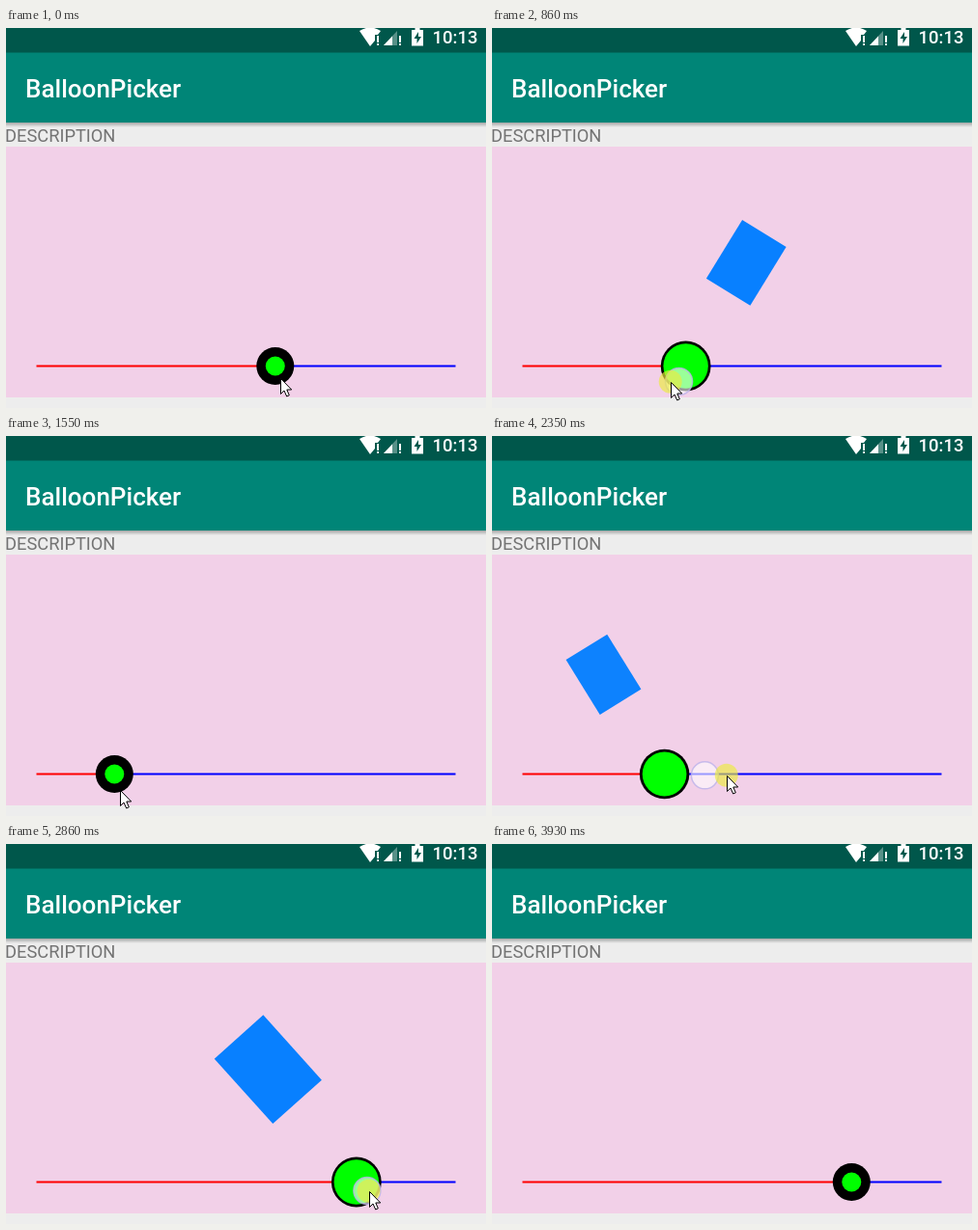
An HTML page that plays this animation: 497 by 394 pixels, repeating every 4.16 s.

```html
<!DOCTYPE html>
<html lang="en">
<head>
<meta charset="utf-8">
<title>BalloonPicker</title>
<style>
  html, body { margin: 0; width: 100%; height: 100%; overflow: hidden; background: #ededed; }
  svg { display: block; width: 497px; height: 394px; }
  text { font-family: Roboto, sans-serif; }
  .bar { fill: #fff; font-weight: 500; }
</style>
</head>
<body>
<svg viewBox="0 0 497 394">
  <defs>
    <linearGradient id="shade" x2="0" y2="1">
      <stop stop-color="#000" stop-opacity=".3"/>
      <stop offset="1" stop-color="#000" stop-opacity="0"/>
    </linearGradient>
  </defs>

  <rect width="497" height="394" fill="#ededed"/>
  <rect y="123" width="497" height="260" fill="#f2d0e8"/>
  <rect y="98" width="497" height="5" fill="url(#shade)"/>
  <rect width="497" height="98" fill="#008577"/>
  <rect width="497" height="25.500" fill="#00574b"/>

  <g fill="#fff">
    <path d="M366 3Q377-4 388 3L385 7H382V13L377 19Z"/>
    <path d="M384 8h2v7h-2zM384 16h2v2h-2zM407 8h2v7h-2zM407 16h2v2h-2z"/>
    <path d="M391 18L405 3V18Z" opacity=".35"/>
    <path d="M391 18L400 8.500V18Z"/>
    <path d="M420 2h3.500v-2h5v2h3.500v16.500h-12z"/>
  </g>
  <path d="M427 4l-4.500 7h3v5l4.500-7h-3z" fill="#00574b"/>
  <text class="bar" x="441.500" y="16.300" font-size="18.500">10:13</text>
  <text class="bar" x="20" y="72" font-size="26">BalloonPicker</text>
  <text x="-1" y="118" font-size="18.300" fill="#737373">DESCRIPTION</text>

  <path id="done" stroke="#f00" stroke-width="2"/>
  <path id="rest" stroke="#00f" stroke-width="2"/>
  <rect id="balloon" x="-.375" y="-.5" width=".75" height="1" fill="#0880ff"/>
  <g id="thumb">
    <circle id="rim"/>
    <circle id="core" fill="#0f0"/>
  </g>
  <circle id="dot" r="14" fill="#fff" fill-opacity=".6" stroke="#bcb2ea" stroke-opacity=".8" stroke-width="1.500"/>
  <circle id="glow" r="12" fill="#ebeb3c" fill-opacity=".65"/>
  <path id="arrow" d="M.500 .500V16.500L4 13L6.700 19L9.300 17.800L6.800 12H11.700Z" fill="#fff" stroke="#000"/>
</svg>

<script>
const LOOP = 4160, STEP = 46, FIRST = 40;
const TRACK_Y = 350.5, REACH = 102, FADE = 300;
const $ = id => document.getElementById(id);

const ease = u => .5 - .5 * Math.cos(Math.PI * Math.min(1, Math.max(0, u)));
const glide = (t, start, time, by) => by * ease((t - start) / time);

// Each drag is a quick flick followed by a slower pull.
const pointerX = t => 284
  + glide(t, 384, 155, -48) + glide(t, 550, 600, -118.5)
  + glide(t, 2129, 359, 198) + glide(t, 2456, 430, 62)
  + glide(t, 3660, 240, 88);
const pointerY = t => 363
  + glide(t, 400, 200, 4) + glide(t, 2150, 180, -15)
  + glide(t, 2350, 450, 8) + glide(t, 3660, 240, 34);
const balloonX = t => 279 + glide(t, 480, 1720, -167) + glide(t, 2265, 1015, 260);

// 0 at rest, 1 while the thumb is held down.
const press = t => glide(t, 110, FADE, 1) - glide(t, 1200, FADE, 1)
  + glide(t, 2070, FADE, 1) - glide(t, 3440, FADE, 1);
const touching = t => (t >= 40 && t < 1210) || (t >= 2010 && t < 3450);

const set = (id, name, value) => $(id).setAttribute(name, value);
const show = (id, on) => set(id, 'visibility', on ? 'visible' : 'hidden');
const move = (id, x, y, more = '') => set(id, 'transform', `translate(${x} ${y}) ${more}`);

function draw(t) {
  const p = press(t);
  const x = pointerX(Math.min(t, 3600) - 70) - 5.2;
  const bx = balloonX(t);
  const size = 60.8 + .12 * (x - 114);
  const y = TRACK_Y + (279 - size / 2 - TRACK_Y) * p;
  const tilt = Math.atan2(bx - x, REACH) * 180 / Math.PI;

  set('done', 'd', `M31.5 ${TRACK_Y}H${x}`);
  set('rest', 'd', `M${x} ${TRACK_Y}H465.5`);
  move('thumb', x, TRACK_Y);
  set('rim', 'r', 19.5 + 6.4 * p);
  set('core', 'r', 10 + 13.2 * p);

  show('balloon', p > .001);
  set('balloon', 'opacity', p);
  move('balloon', bx, y, `rotate(${tilt}) scale(${size * p})`);

  const px = pointerX(t), py = pointerY(t);
  show('glow', touching(t));
  show('dot', touching(t - 40) && touching(t));
  show('arrow', t < 3900);
  move('glow', px - .7, py - .3);
  move('dot', pointerX(t - 27), pointerY(t - 27) - .5);
  move('arrow', Math.round(px), Math.round(py));
}

const start = performance.now();
function frame() {
  const t = (performance.now() - start) % LOOP;
  draw(t < FIRST ? 0 : FIRST + STEP * Math.floor((t - FIRST) / STEP));
  requestAnimationFrame(frame);
}
frame();
</script>
</body>
</html>
```
